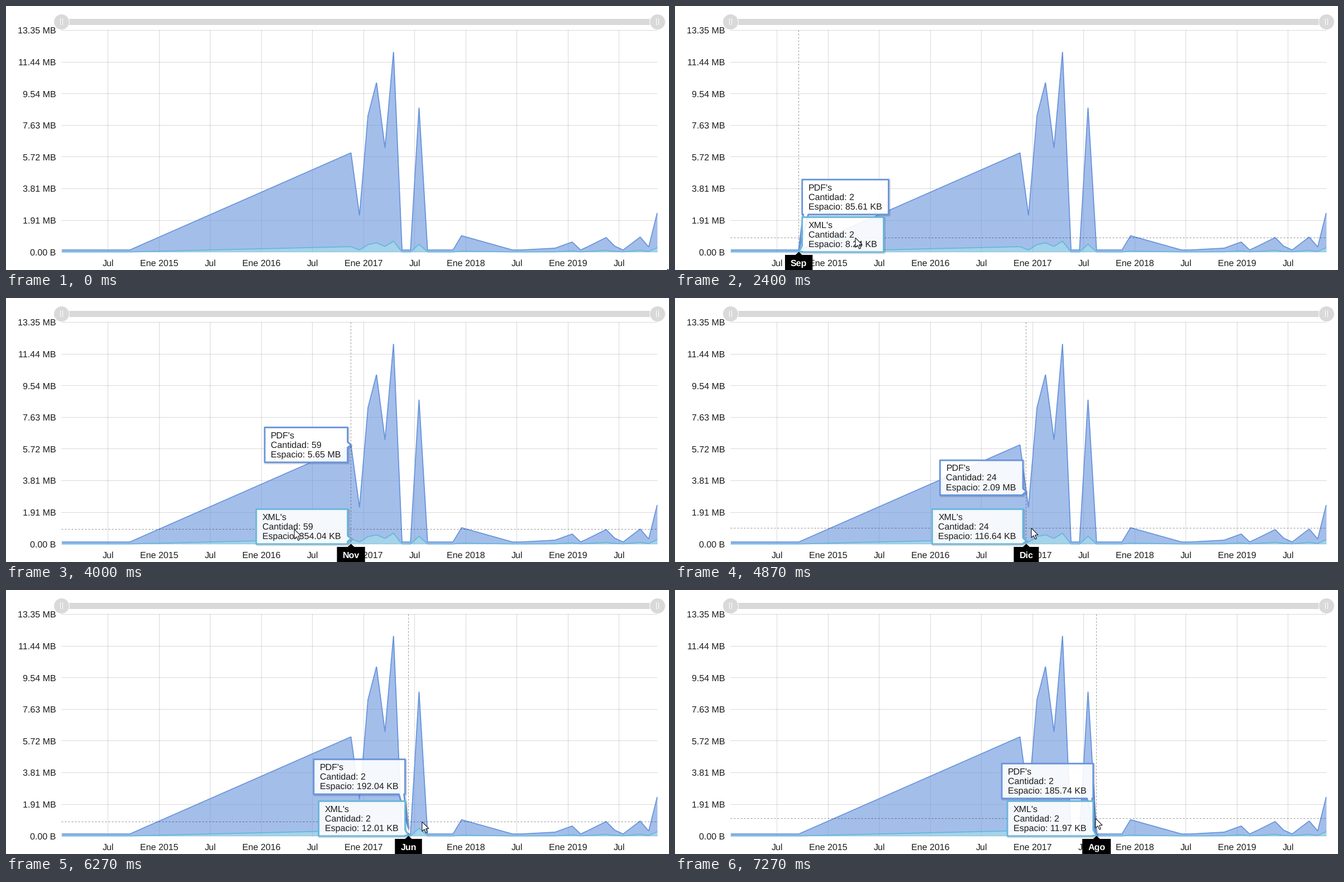
Animation of 1187x472 px, one loop 8.94 s. Source, as a matplotlib script:

```python
import numpy as np
import matplotlib.pyplot as plt
from matplotlib.animation import FuncAnimation
from matplotlib.patches import Circle, Polygon, Rectangle

W, H, DPI = 1187, 472, 64
PX = 72 / DPI                       # points per pixel
LEFT, RIGHT, TOP, BASE = 99.5, 1166, 43.5, 439.8
MAX_MB = 13.35
INTERVAL, FRAMES = 30, 298
STEP = 200 / 3                      # the picture advances 15 times a second
EASE_MS = 400
BLUE, CYAN, GREY = "#6794dc", "#67b7dc", "#d9d9d9"
MONTHS = "Ene Feb Mar Abr May Jun Jul Ago Sep Oct Nov Dic".split()

# MB per month since January 2014; the other active months are nearly empty
PEAKS = {34: 5.97, 35: 2.2, 36: 8.21, 37: 10.2, 38: 6.27, 39: 12.05,
         42: 8.69, 47: 0.98, 58: 0.23, 60: 0.6, 62: 0.36, 64: 0.87,
         65: 0.35, 68: 0.9, 69: 0.3, 70: 2.35}
QUIET = [0, 8, 40, 41, 43, 46, 53, 54, 61, 66]
MONTH = np.array(sorted([*PEAKS, *QUIET]))
MB = np.array([PEAKS.get(m, 0.12) for m in MONTH])
SHARE = np.where(MONTH < 59, 0.054, 0.11)      # part of the lower series

XS = 99.8 + 15.23 * MONTH
SCALE = (BASE - TOP) / MAX_MB
TOTAL = BASE - MB * SCALE
LOWER = BASE - MB * SHARE * SCALE
BOX_LOW, BOX_HIGH = 408.7, 341.5    # box centres when they are stacked

READINGS = {8: (2, "85.61 KB", "8.24 KB"),
            34: (59, "5.65 MB", "354.04 KB"),
            35: (24, "2.09 MB", "116.64 KB"),
            38: (68, "5.94 MB", "340.88 KB"),
            41: (2, "192.04 KB", "12.01 KB"),
            43: (2, "185.74 KB", "11.97 KB")}

# time, x, y of the mouse pointer
MOUSE_T, MOUSE_X, MOUSE_Y = np.array([
    (1067, 200, 430), (2400, 323, 414.5), (3150, 419.5, 415.5),
    (3333, 421, 415.5), (4600, 622, 411.5), (5667, 686, 411.5),
    (6210, 731, 414), (6267, 745, 414.5), (7267, 753, 408.5)]).T
ARROW = np.array([(0, 0), (0, 17), (4, 13.3), (6.8, 19.8), (9.3, 18.7),
                  (6.6, 12.3), (12, 12)])

# The nearest point is picked one step after the mouse passes a midpoint.
PICKED = range(1, 12)
STARTS = [np.interp((XS[i - 1] + XS[i]) / 2, MOUSE_X, MOUSE_T) + STEP
          for i in PICKED]

plt.rcParams["font.family"] = "Liberation Sans"
plt.rcParams["text.hinting"] = "none"

fig = plt.figure(figsize=(W / DPI, H / DPI), dpi=DPI, facecolor="white")
ax = fig.add_axes([0, 0, 1, 1])
ax.set_xlim(0, W)
ax.set_ylim(H, 0)
ax.axis("off")


def label(x, y, s, z=3, **kw):
    opts = dict(fontsize=16 * PX, color="#1c1c1c", va="baseline", zorder=z)
    return ax.text(x, y, s, **{**opts, **kw})


def shape(z, **kw):
    return ax.add_patch(Polygon([(0, 0), (1, 0), (1, 1)], zorder=z, **kw))


def line(xs, ys, **kw):
    return ax.plot(xs, ys, lw=PX, snap=False, **kw)[0]


def crisp(v):
    """Centre of the pixel that holds v."""
    return int(v) + 0.5


def size_text(mb):
    return f"{mb:.2f} MB" if mb >= 1 else f"{mb * 1024:.2f} KB"


def reading(i):
    mb, low = MB[i], MB[i] * SHARE[i]
    guess = (max(2, round(11 * mb)), size_text(mb - low), size_text(low))
    return READINGS.get(MONTH[i], guess)


def draw_chart():
    grid = dict(color="black", alpha=0.15, zorder=1)
    for k in range(8):
        y = TOP + k * (BASE - TOP) / 7
        line([LEFT, RIGHT], [crisp(y)] * 2, **grid)
        text = f"{MAX_MB * (7 - k) / 7:.2f} MB" if k < 7 else "0.00 B"
        label(89.5, y + 5.7, text, ha="right")
    for k in range(11):
        x = crisp(182.5 + 91.5 * k)
        line([x, x], [TOP, BASE], **grid)
        text = f"Ene {2014 + (k + 1) // 2}" if k % 2 else "Jul"
        label(x, 464.5, text, ha="center")

    ax.fill_between(XS, TOTAL, LOWER, color=BLUE, alpha=0.6, lw=0, zorder=2)
    ax.fill_between(XS, LOWER, BASE, color=CYAN, alpha=0.6, lw=0, zorder=2)
    for ys, color in ((LOWER, CYAN), (TOTAL, BLUE)):
        ax.plot(XS, ys, color=color, lw=1.8 * PX, zorder=2.5,
                solid_joinstyle="bevel", solid_capstyle="butt")

    ax.add_patch(Rectangle((LEFT, 23), RIGHT - LEFT, 11, fc=GREY, lw=0))
    for x in (99.5, 1166.5):
        ax.add_patch(Circle((x, 28.5), 14, fc=GREY, ec="white", lw=PX, zorder=4))
        for dx in (-2, 2):
            line([x + dx] * 2, [22.5, 34], color="white", zorder=5)


class Tooltip:
    """Box with a pointer and three lines of text."""

    def __init__(self, title, color, z):
        self.shadow = shape(z, fill=False, ec="black", alpha=0.15,
                            lw=4 * PX, joinstyle="round")
        self.fill = shape(z + 0.1, fc="white", alpha=0.9, lw=0)
        self.edge = shape(z + 0.2, fill=False, ec=color, lw=2.8 * PX,
                          joinstyle="round")
        self.lines = [label(0, 0, s, z + 0.3) for s in (title, "", "")]
        self.parts = [self.shadow, self.fill, self.edge, *self.lines]

    def place(self, tx, ty, cy, on_right, count, size):
        self.lines[1].set_text(f"Cantidad: {count}")
        self.lines[2].set_text(f"Espacio: {size}")
        side = 1 if on_right else -1
        near = tx + 6 * side
        far = near + side * (self.lines[2].get_window_extent().width + 23)
        y0, y1 = cy - 31.2, cy + 31.2
        if ty > y1 + 2:
            pointer = [(near, y1), (near + 2 * side, y1), (tx, ty),
                       (near + 11 * side, y1)]
        else:
            mid = min(max(ty, y0 + 6), y1 - 6)
            pointer = [(near, mid - 5), (tx, ty), (near, mid + 5), (near, y1)]
        pts = np.array([(far, y0), (near, y0), *pointer, (far, y1)])
        self.shadow.set_xy(pts + 1.5)
        self.fill.set_xy(pts)
        self.edge.set_xy(pts)
        for k, text in enumerate(self.lines):
            text.set_position((min(near, far) + 11, cy - 12 + 17 * k))


draw_chart()
dash = dict(color="black", alpha=0.42, ls=(0, (3, 3)), zorder=6)
v_line = line([0, 0], [TOP, BASE], **dash)
h_line = line([LEFT, RIGHT], [0, 0], **dash)
upper = Tooltip("PDF's", BLUE, 7)
lower = Tooltip("XML's", CYAN, 8)
tag = shape(9, fc="black", lw=0)
tag_text = label(0, 464.5, "", 9.1, color="white", weight="bold", ha="center")
mouse = shape(10, fc="white", ec="black", lw=PX, joinstyle="miter")
hover = [v_line, h_line, tag, tag_text, *upper.parts, *lower.parts]


def goal(i):
    """Crosshair x, both pointer tips and the centre of the upper box."""
    return np.array([XS[i], TOTAL[i], LOWER[i], min(TOTAL[i], BOX_HIGH)])


def eased(t):
    """Each picked point pulls the pose from wherever it has got to."""
    pose = goal(PICKED[0])
    for i, start, end in zip(PICKED, STARTS, [*STARTS[1:], np.inf]):
        u = np.clip((min(t, end) - start) / EASE_MS, 0, 1)
        pose = pose + (goal(i) - pose) * (1 - (1 - u) ** 3)
    return pose


def place_tag(x, name):
    tag_text.set_text(name)
    tag_text.set_x(x)
    half = tag_text.get_window_extent().width / 2 + 10
    tag.set_xy([(x - half, 445), (x - 6, 445), (x, 439.5), (x + 6, 445),
                (x + half, 445), (x + half, H + 2), (x - half, H + 2)])


def update(frame):
    step = int((frame * INTERVAL + 7) // STEP)
    t = step * STEP
    if step < 3:
        mx, my = 1184.5, 470.5
    else:
        mx, my = np.interp(t, MOUSE_T, MOUSE_X), np.interp(t, MOUSE_T, MOUSE_Y)
    mouse.set_visible(step < 3 or step >= 16)
    mouse.set_xy(ARROW + (mx, my))

    active = t >= STARTS[0]
    for part in hover:
        part.set_visible(active)
    if active:
        i = PICKED[np.searchsorted(STARTS, t, side="right") - 1]
        x, y_up, y_low, center = eased(t)
        count, big, small = reading(i)
        on_right = x < W / 2 and i == PICKED[0]
        v_line.set_xdata([crisp(x)] * 2)
        h_line.set_ydata([crisp(my)] * 2)
        upper.place(x, y_up, center, on_right, count, big)
        lower.place(x, y_low, BOX_LOW, on_right, count, small)
        place_tag(x, MONTHS[MONTH[i] % 12])
    return [mouse, *hover]


anim = FuncAnimation(fig, update, frames=FRAMES, interval=INTERVAL,
                     init_func=lambda: update(0), repeat=True, blit=False)
plt.show()
```
